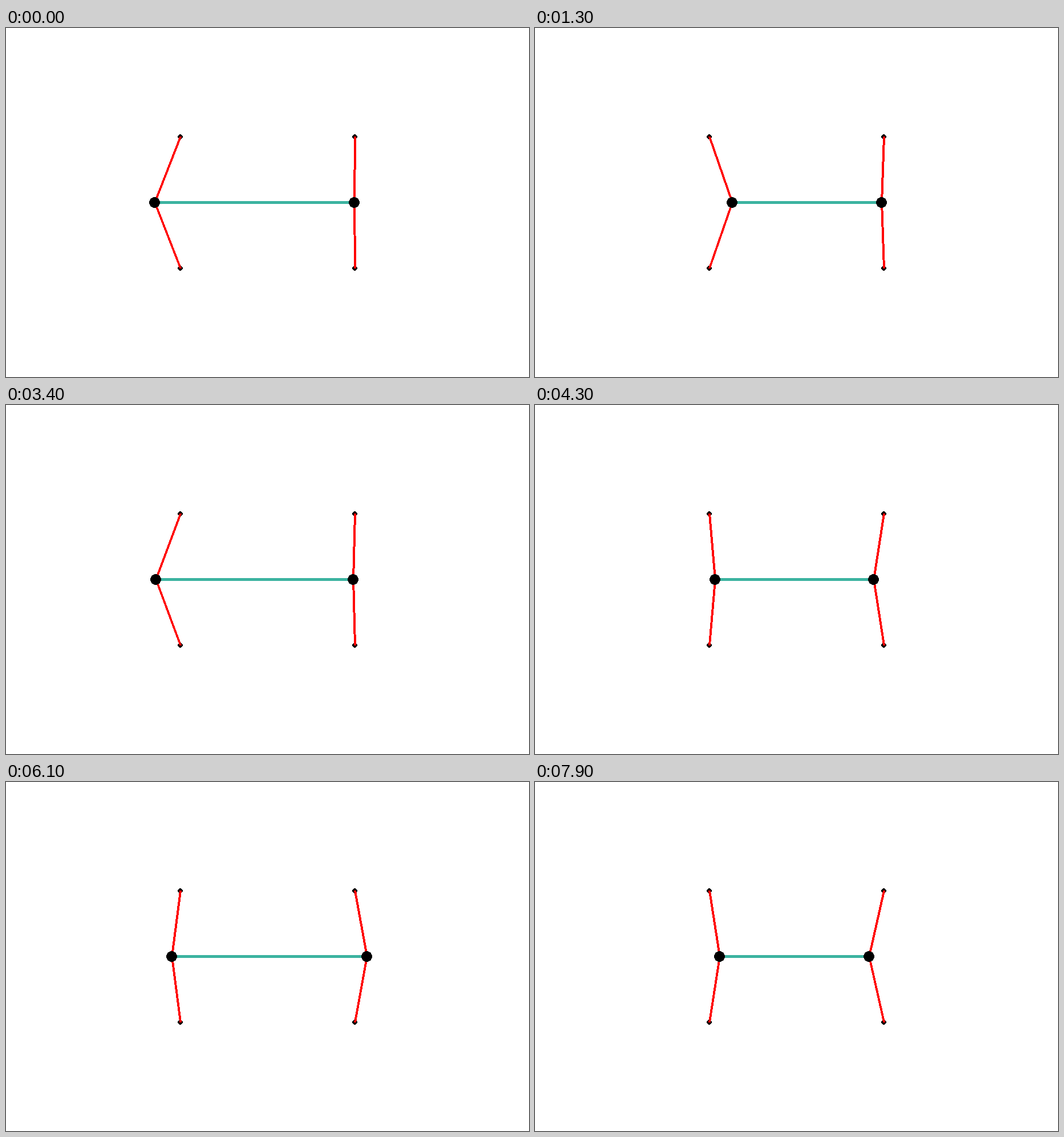
These frames come from a looping animation (917 by 611 pixels, 8000 ms). A matplotlib script:

```python
import numpy as np
import matplotlib.pyplot as plt
from matplotlib.animation import FuncAnimation
from matplotlib.collections import PolyCollection
from matplotlib.patches import Polygon

W, H, DPI = 917, 611, 100
FRAMES, STEP = 80, 100

MID_Y = H // 2
ANCHOR_X = (305, 611)
ANCHOR_Y = (190, 420)
REST = (305.43, 610.55)

# Normal modes of two coupled masses: amplitude, rad/s, phase
IN_PHASE = (46.2, 1.74, 0.23)
OPPOSED = (46.2, 1.9, 0.30)

fig = plt.figure(figsize=(W / DPI, H / DPI), dpi=DPI, facecolor="white")
ax = fig.add_axes([0, 0, 1, 1])
ax.set(xlim=(0, W), ylim=(H, 0))
ax.axis("off")

# Without antialiasing every touched pixel is filled,
# so all edges below run through pixel interiors.


def box(left, top, right, bottom):
    """Rectangle over whole pixels, all bounds inclusive."""
    a, b, c, d = left + 0.25, top + 0.25, right + 0.75, bottom + 0.75
    return [(a, b), (c, b), (c, d), (a, d)]


def disc(x, y, r):
    """Pixel disc as a stack of rows."""
    rows = range(-int(r), int(r) + 1)
    halves = [int(np.sqrt(r * r - k * k)) for k in rows]
    return [box(x - h, y + k, x + h, y + k) for k, h in zip(rows, halves)]


def dot(x, y, r, z):
    dots = PolyCollection(disc(x, y, r), facecolors="black", edgecolors="none",
                          linewidths=0, antialiaseds=False, zorder=z)
    dots.set_snap(False)
    return ax.add_collection(dots, autolim=False)


def bar(color, z):
    return ax.add_patch(Polygon(np.zeros((4, 2)), fc=color, lw=0,
                                aa=False, snap=False, zorder=z))


def string_shape(x0, y0, x1, y1):
    """Steep line, four pixels wide along x."""
    half = 1.5 - abs((x1 - x0) / (y1 - y0)) / 2
    a, b = x0 + 1, x1 + 1
    return [(a - half, y0 + 0.5), (a + half, y0 + 0.5),
            (b + half, y1 + 0.5), (b - half, y1 + 0.5)]


def mode(t, amp, omega, phase):
    return -amp * np.cos(omega * t + phase)


def mass_positions(t):
    s, d = mode(t, *IN_PHASE), mode(t, *OPPOSED)
    return int(REST[0] + (s + d) / 2), int(REST[1] + (s - d) / 2)


ANCHOR_R, MASS_R = 4.15, 9.3

for x in ANCHOR_X:
    for y in ANCHOR_Y:
        dot(x, y, ANCHOR_R, 1)

strings = [[bar("#ff0000", 2) for _ in ANCHOR_Y] for _ in ANCHOR_X]
spring = bar("#3cb3a0", 3)
masses = [dot(x, MID_Y, MASS_R, 4) for x in ANCHOR_X]


def draw(i):
    xs = mass_positions(i * STEP / 1000)
    for x, ax_x, pair, mass in zip(xs, ANCHOR_X, strings, masses):
        mass.set_verts(disc(x, MID_Y, MASS_R))
        for y, line in zip(ANCHOR_Y, pair):
            line.set_xy(string_shape(ax_x, y, x, MID_Y))
    spring.set_xy(box(xs[0], MID_Y - 2, xs[1], MID_Y + 2))
    return [spring, *masses, *strings[0], *strings[1]]


anim = FuncAnimation(fig, draw, frames=FRAMES, interval=STEP, repeat=True,
                     repeat_delay=0, init_func=lambda: draw(0))
plt.show()
```
